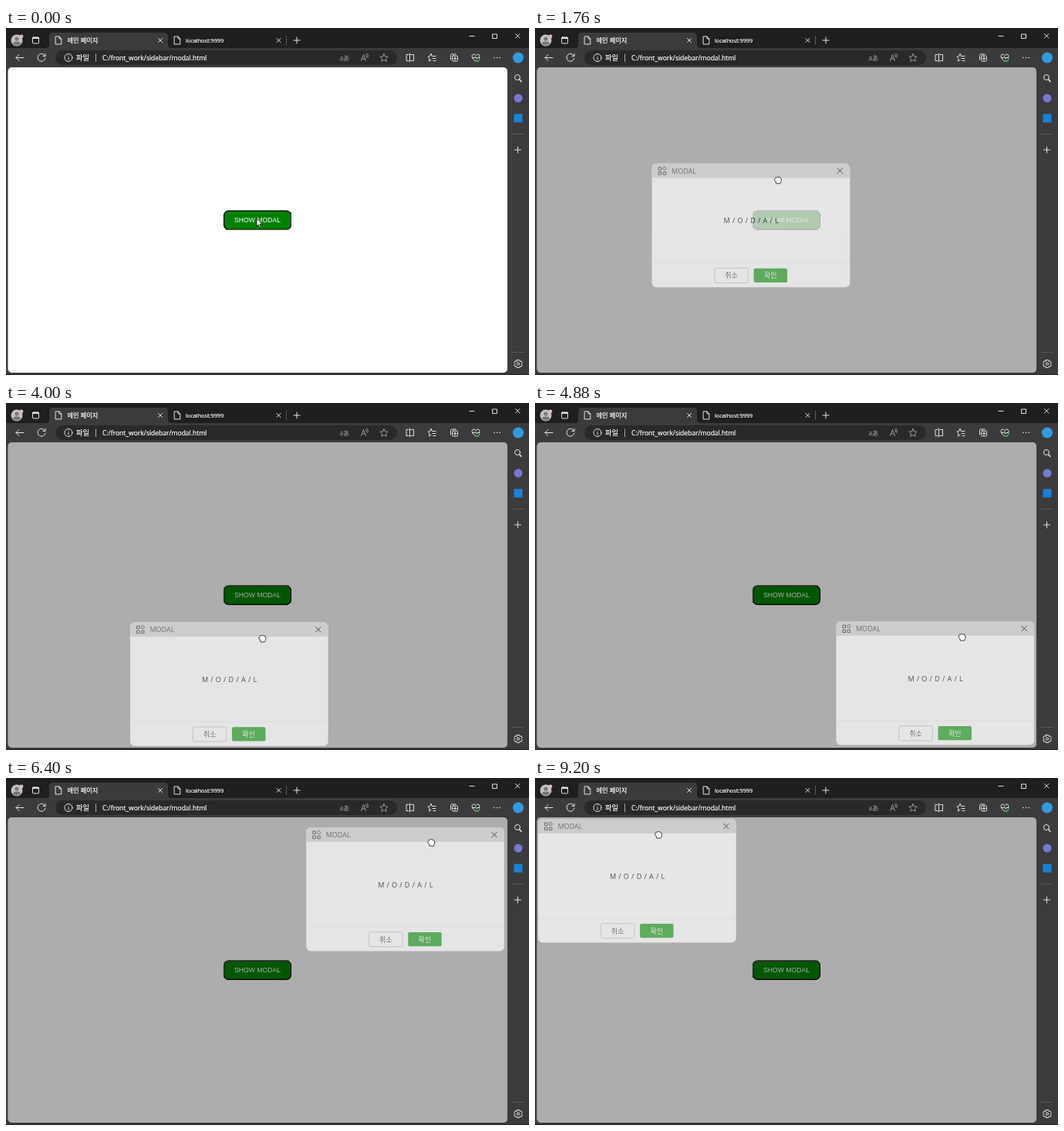
Write an HTML page that moves like this. It is 678 by 450 pixels and loops after 9.52 s.

```html
<!DOCTYPE html>
<html lang="ko">
<meta charset="utf-8">
<title>Draggable modal</title>
<style>
html, body { margin: 0; width: 100%; height: 100%; overflow: hidden; background: #3b3b3b; }
svg { display: block; width: 678px; height: 450px; fill: none; }
text { font: 9px "Open Sans", "Noto Sans CJK KR", "Noto Sans CJK", sans-serif; fill: #fff; }
.bar text { stroke: #fff; stroke-width: .2; }
.ic { stroke: #e4e4e4; stroke-width: 1; stroke-linecap: round; stroke-linejoin: round; }
.dim { stroke: #9b9b9b; }
.mid { text-anchor: middle; }
</style>
<svg viewBox="0 0 678 450">
  <defs>
    <clipPath id="page"><rect x="2.5" y="51" width="647.5" height="396" rx="5"/></clipPath>
    <path id="doc" d="M-3.5-5H1L3.8-2V5H-3.5ZM1-5V-2H3.8"/>
    <path id="x" d="M-2.5-2.5L2.5 2.5M2.5-2.5L-2.5 2.5"/>
    <path id="plus" d="M-4 0H4M0-4V4"/>
    <path id="star" d="M0-5L1.5-1.6 5.1-1.3 2.4 1.2 3.2 4.8 0 2.9-3.2 4.8-2.4 1.2-5.1-1.3-1.5-1.6Z"/>
  </defs>

  <!-- browser frame -->
  <g class="bar">
    <path fill="#1f1f1f" d="M0 0H678V26H0Z"/>
    <path fill="#3b3b3b" d="M52 26Q56 26 56 22V11Q56 6 61 6H205Q210 6 210 11V22Q210 26 214 26Z"/>
    <rect x="64" y="29" width="443" height="19" rx="9.5" fill="#292929"/>
    <path stroke="#232323" d="M0 449.5H678"/>
    <circle cx="14" cy="16" r="7.5" fill="#c4c1bf"/>
    <circle cx="14" cy="14" r="2.6" fill="#777"/>
    <path fill="#777" d="M9 20.5Q9 17.5 14 17.5T19 20.5Q14 24.5 9 20.5Z"/>
    <circle cx="20" cy="11" r="2.4" fill="#e5b5b5"/>
    <g class="ic">
      <rect x="34.5" y="12" width="8" height="8" rx="1"/>
      <path stroke-width="2" d="M35 13H42"/>
      <use href="#doc" x="68" y="16"/>
      <use href="#doc" x="222" y="16"/>
      <use href="#x" x="200" y="16"/>
      <use href="#x" x="353.5" y="16"/>
      <use href="#plus" x="377" y="16"/>
      <path d="M601 10.5H607M631 8H636.5V13.5H631ZM660.5 7.5L666 13M666 7.5L660.5 13"/>
      <path d="M23 38.5H13M17 34.5L13 38.5 17 42.5M50.5 36A5 5 0 1 0 51 39M51 33.5V36.5H48"/>
      <circle cx="81" cy="38.5" r="5"/>
      <path d="M81 38V41M81 35.9V36"/>
      <path d="M523.5 33V44M522 34.5H519V42.5H522M525 34.5H528.5V42.5H525"/>
      <path d="M551 33.5L552.3 36.5H557M551 33.5L549.5 36.7 547 37 549 39.5 548.5 43 551 41.5M553 39.5H557M554 42.5H557"/>
      <rect x="578.5" y="36" width="7" height="7" rx="1.5"/>
      <path d="M576.5 41V35.5Q576.5 34 578 34H583M582 37.5V41.5M580 39.5H584"/>
      <path d="M609 43.5L604.7 39Q603 35 606 34 608 34 609 35.8 610 34 612 34 615 35 613.3 39M605 38.5H607.5L608.5 37 610 40 611 38.5H614"/>
      <path stroke="#37b34a" stroke-width="1.6" d="M610 42L611.5 43.5 614 40.5"/>
      <path stroke-width="1.6" d="M633 38.5H633.1M636.7 38.5H636.8M640.4 38.5H640.5"/>
      <circle cx="663" cy="64" r="3.5"/>
      <path stroke-width="1.5" d="M665.7 66.7L668 69.5"/>
      <use href="#plus" x="663.5" y="158"/>
      <circle cx="664" cy="435.5" r="1.6"/>
      <path d="M662.5 430.5H665.5L666 432.3 668 431.8 669.3 434.2 668 435.5 669.3 437 668 439.3 666 438.8 665.5 440.5H662.5L662 438.8 660 439.3 658.7 437 660 435.5 658.7 434.2 660 431.8 662 432.3Z"/>
    </g>
    <path stroke="#595959" d="M363.5 10V22M656 137.5H672M656 420.5H672"/>
    <path stroke="#aaa" d="M116.5 33.5V44"/>
    <use class="ic dim" href="#star" x="490" y="38.5"/>
    <path class="ic dim" d="M460.5 42.5L463.5 34.5 466.5 42.5M461.5 40H465.5M466 34Q468 35 467.5 37.5M468 33Q470.5 35 469 38.5"/>
    <text x="432.5" y="41.5" style="fill:#aaa;stroke:none;font-size:8.2px">aあ</text>
    <circle cx="664" cy="38.5" r="7" fill="#2f9be0"/>
    <circle cx="664" cy="91" r="5.5" fill="#7479d2"/>
    <rect x="658.5" y="111.5" width="11" height="11" fill="#1683d8"/>
    <text x="79.5" y="18.8" style="font-size:8.2px">메인 페이지</text>
    <text x="233" y="18.8" style="font-size:7.3px">localhost:9999</text>
    <text x="91" y="42" style="font-size:9.3px">파일</text>
    <text x="125" y="41.5" style="font-size:8.5px">C:/front_work/sidebar/modal.html</text>
  </g>

  <!-- page -->
  <g clip-path="url(#page)">
    <path fill="#fff" d="M0 50H650V450H0Z"/>
    <rect x="282.6" y="237.1" width="86.8" height="24.2" rx="6" fill="#008000" stroke="#000" stroke-width="1.3"/>
    <path id="lit" stroke="#4c4c4c" stroke-width="1.3"/>
    <text class="mid" x="326" y="252" style="font:8.65px 'Liberation Sans',Arial,sans-serif">SHOW MODAL</text>
    <path id="shade" fill="#000" d="M0 50H650V450H0Z"/>
    <g id="modal">
      <rect width="256.7" height="160.5" rx="6" fill="#fff"/>
      <path fill="#dadada" d="M0 18.8V6Q0 0 6 0H250.7Q256.7 0 256.7 6V18.8Z"/>
      <path stroke="#444" stroke-width=".9" d="M8.5 5H12V8.500H8.5ZM8.5 11H12V14.500H8.5ZM14.500 11H18V14.500H14.500ZM16.200 4L18.700 6.500 16.200 9 13.700 6.500Z"/>
      <path stroke="#222" d="M240.300 6L247.300 13M247.300 6L240.300 13"/>
      <text x="25.500" y="13.200" style="fill:#555">MODAL</text>
      <text class="mid" x="128.800" y="77.700" style="letter-spacing:.45px;fill:#222">M / O / D / A / L</text>
      <path stroke="#f2f2f2" d="M0 129H256.700"/>
      <rect x="81.300" y="135.800" width="43.500" height="19" rx="2" fill="#fff" stroke="#ccc"/>
      <rect x="132" y="136" width="43.500" height="18.300" rx="2" fill="#3aab3a"/>
      <text class="mid" x="103" y="148.800" style="fill:#555">취소</text>
      <text class="mid" x="153.700" y="148.800">확인</text>
    </g>
  </g>

  <g id="cursor" fill="#fff" stroke="#111" stroke-width=".8" stroke-linejoin="round">
    <path id="arrow" d="M-3-5V5L-.8 3 .8 6.5 2.5 5.7 1 2.4H4.2Z"/>
    <path id="hand" d="M-3.5-2.4Q-3-4.900-1.300-3.900Q0-5.600 1.300-3.900Q3-4.900 3.300-2.900Q5-2.900 4.500-.4Q4.400 1.600 3 4.100H-2.200Q-3-.4-4.500-.4Q-4.700-2.400-3.500-2.400Z"/>
  </g>
</svg>
<script>
const LOOP = 9520, STEP = 80, GRAB = 1120;
const $ = id => document.getElementById(id);
const rest = { modal: [198, 169], hand: [328, 252] };

// each leg eases both parts to a new place; bend > 1 delays the vertical part
const legs = [
  { from: 640, to: 1200, modal: rest.modal, hand: [357, 191] },
  { from: 1200, to: 2960, modal: [4, 285], hand: [181, 307], bend: 2 },
  { from: 3260, to: 4960, modal: [393, 283], hand: [556, 304] },
  { from: 5280, to: 6580, modal: [389, 52], hand: [551, 72] },
  { from: 6600, to: 7120, modal: [389, 52], hand: [514, 72] },
  { from: 7226, to: 8162, modal: [4, 53], hand: [160, 74] }
];

const clamp = k => Math.min(Math.max(k, 0), 1);
const smooth = k => k * k * (3 - 2 * k);

function position(part, t) {
  let [x, y] = rest[part];
  for (const { from, to, bend = 1, [part]: end } of legs) {
    const k = smooth(clamp((t - from) / (to - from)));
    x += (end[0] - x) * k;
    y += (end[1] - y) * k ** bend;
  }
  return [x, y];
}

const place = (id, p) => $(id).setAttribute("transform", `translate(${p})`);
const show = (id, on) => $(id).style.display = on ? "" : "none";

function draw(now) {
  const t = Math.floor(now % LOOP / STEP) * STEP;
  const shown = clamp(t / 480);
  // the button's bevel is inverted while pressed
  $("lit").setAttribute("d", t < STEP
    ? "M285 261.3H363.4Q369.4 261.3 369.4 255.3V239"
    : "M282.6 259V243.1Q282.6 237.1 288.6 237.1H367");
  $("shade").style.opacity = 0.32 * shown;
  $("modal").style.opacity = 0.69 * shown;
  place("modal", position("modal", t));
  place("cursor", position("hand", t));
  show("arrow", t < GRAB);
  show("hand", t >= GRAB);
}

const start = performance.now();
function tick() {
  draw(performance.now() - start);
  requestAnimationFrame(tick);
}
tick();
</script>
</html>
```
